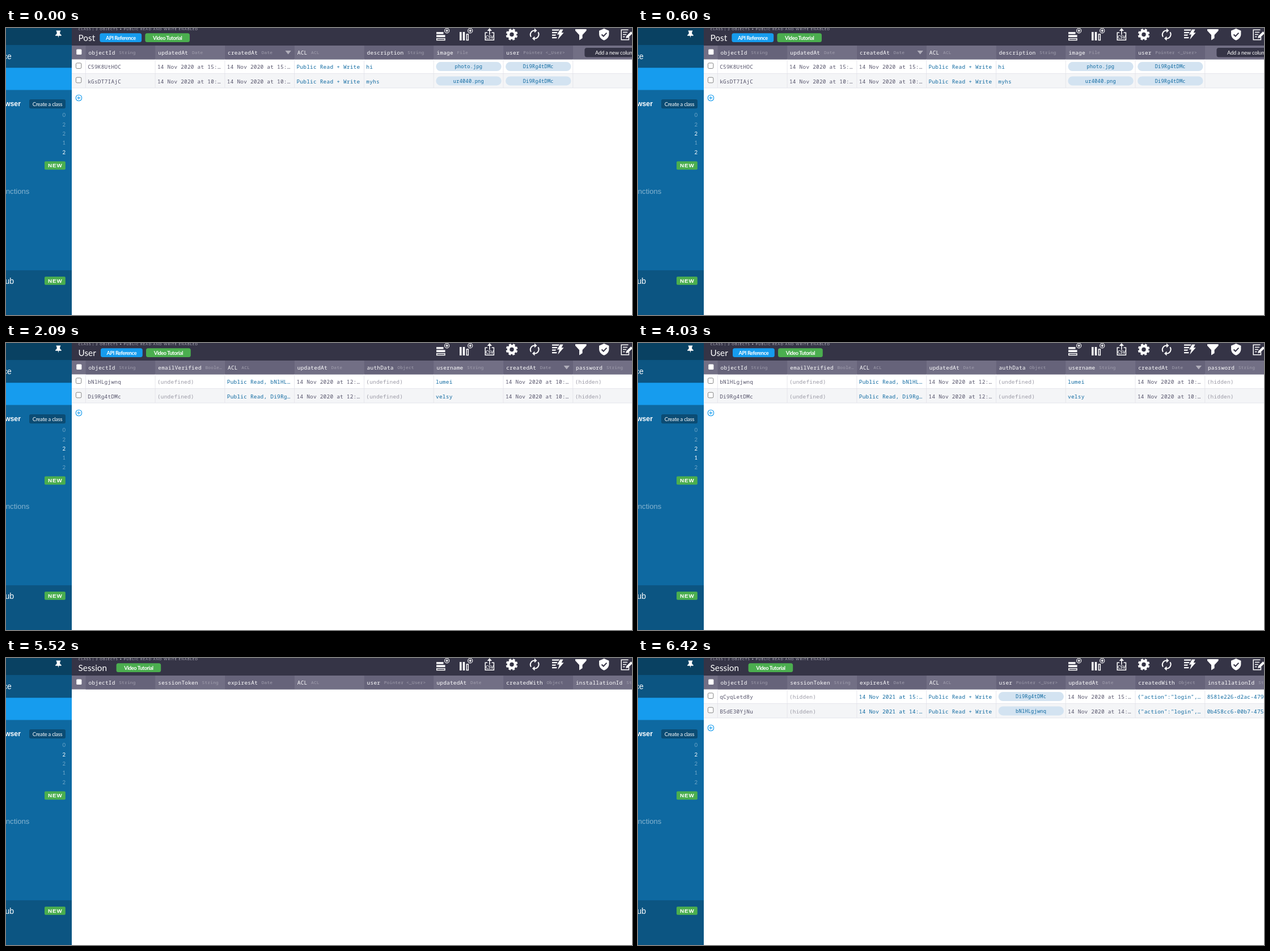
An HTML page that plays this animation: 1104x507 px, repeating every 8000 ms.

```html
<!DOCTYPE html>
<html lang="en">
<head>
<meta charset="utf-8">
<title>Data browser</title>
<style>
html, body { margin: 0; width: 100%; height: 100%; overflow: hidden; background: #fff; }
svg { display: block; width: 100%; height: 100%; }
text { white-space: pre; }
.mono { font: 9.4px "Noto Sans Mono", "DejaVu Sans Mono", monospace; letter-spacing: .26px; }
.type { font-size: 7.9px; letter-spacing: .17px; fill: #a19fae; }
.pill { font-size: 8.6px; letter-spacing: .25px; }
.ui { font-family: Lato, "Open Sans", sans-serif; }
.side { font-family: "Liberation Sans", Arial, sans-serif; fill: #fff; }
.btn { font-size: 9.2px; font-weight: 700; letter-spacing: -.42px; fill: #fff; }
.new { font-size: 9.8px; font-weight: 700; letter-spacing: .9px; }
.line { fill: none; stroke: #fff; stroke-width: 1.5; }
.count { font-size: 9.6px; fill: #6ea5c7; }

.scene, .count { animation: 8s step-end infinite; }
.postHead { animation-name: post; }
.postRows { animation-name: post; }
.userHead { animation-name: userHead; }
.userRows { animation-name: userRows; }
.sessionHead { animation-name: sessionHead; }
.sessionRows { animation-name: sessionRows; }
@keyframes post { 0% { visibility: visible } 20.5%, 100% { visibility: hidden } }
@keyframes userHead { 0% { visibility: hidden } 20.5% { visibility: visible } 69%, 100% { visibility: hidden } }
@keyframes userRows { 0% { visibility: hidden } 26.125% { visibility: visible } 69%, 100% { visibility: hidden } }
@keyframes sessionHead { 0% { visibility: hidden } 69%, 100% { visibility: visible } }
@keyframes sessionRows { 0% { visibility: hidden } 80.25%, 100% { visibility: visible } }

.sessionCount { animation-name: sessionCount; }
.userCount { animation-name: userCount; }
.oneCount { animation-name: oneCount; }
.postCount { animation-name: postCount; }
@keyframes sessionCount { 0% { fill: #6ea5c7 } 63.5%, 100% { fill: #fff } }
@keyframes userCount { 0% { fill: #6ea5c7 } 7.5% { fill: #fff } 69%, 100% { fill: #6ea5c7 } }
@keyframes oneCount { 0% { fill: #6ea5c7 } 50.375% { fill: #fff } 63.5%, 100% { fill: #6ea5c7 } }
@keyframes postCount { 0% { fill: #fff } 20.5%, 100% { fill: #6ea5c7 } }
</style>
</head>
<body>
<svg id="stage" viewBox="0 0 1104 507" preserveAspectRatio="none"></svg>
<script>
const LEFT = 140.6, COL = 122.78, CHAR = 5.9;
const INK = '#55536a', LINK = '#0e69a1', MUTED = '#9a99a5', BLUE = '#169cee', GREEN = '#4bae4f';
const colX = i => LEFT + i * COL;
const esc = s => s.replace(/&/g, '&amp;').replace(/</g, '&lt;');
const rect = (x, y, w, h, fill, r = 0, more = '') =>
  `<rect x="${x}" y="${y}" width="${w}" height="${h}" fill="${fill}" rx="${r}" ${more}/>`;
const text = (x, y, s, cls, more = '') => `<text x="${x}" y="${y}" class="${cls}" ${more}>${esc(s)}</text>`;
const mid = 'text-anchor="middle"', end = 'text-anchor="end"';
const path = (d, cls = '') => `<path d="${d}" ${cls ? `class="${cls}"` : 'fill="#fff"'}/>`;
const button = (x, w, fill, label) => rect(x, 9.3, w, 15.8, fill, 3.5) + text(x + w / 2, 20.9, label, 'ui btn', mid);

function sidebar() {
  const badge = y => rect(68, y, 36.8, 14.6, GREEN, 2) + text(74, y + 10.8, 'NEW', 'side new');
  const counts = [['0', ''], ['2', 'sessionCount'], ['2', 'userCount'], ['1', 'oneCount'], ['2', 'postCount']];
  return rect(0, 0, 116, 507, '#0e69a1') + rect(0, 0, 116, 30.5, '#094162') +
    rect(0, 30.5, 116, 40, '#0c5582') + rect(0, 70.3, 116, 39.2, BLUE) + rect(0, 428, 116, 79, '#0c5582') +
    path('M88.6 4.5h7.6v1.4l-1 .8v3.6l2.5 2.1v1.3h-4.6l-.7 3.8-.7-3.8h-4.6v-1.3l2.5-2.1V6.7l-1-.8z') +
    text(9.8, 55, 'ce', 'side', end + ' font-size="14"') +
    text(26, 138.3, 'wser', 'side', end + ' font-size="12.3" font-weight="700"') +
    text(41.3, 293, 'nctions', 'side', end + ' font-size="13.1" style="fill:#86b4d0"') +
    text(14, 451.5, 'ub', 'side', end + ' font-size="14"') +
    rect(41, 126, 64, 16.2, '#0b4c74', 3) +
    text(73, 137.5, 'Create a class', 'ui', mid + ' font-size="9.4" letter-spacing="-.25" fill="#fff"') +
    counts.map(([n, cls], i) => text(105, 157.2 + i * 16.35, n, 'ui count ' + cls, end)).join('') +
    badge(235.6) + badge(439.2);
}

function icons() {
  const plus = x => `<circle cx="${x}" cy="4.8" r="4.1" class="line" stroke-width="1" style="stroke-width:1.1"/>` +
    path(`M${x - 2.2} 4.8h4.4M${x} 2.6v4.4`, 'line');
  const addRow = rect(759, 7.2, 12.5, 3.4, '#fff') + rect(759, 12.4, 15.5, 3.6, '#fff') +
    path('M759.7 18.4h14.2v3h-14.2z', 'line') + plus(777.6);
  const addCol = rect(800, 7, 3.5, 15, '#fff') + rect(805.7, 7, 3.5, 15, '#fff') +
    path('M812.3 11v10.4h3V11z', 'line') + plus(818.7);
  const csv = path('M849 8.2h-3.8v13.1h15.2V8.2h-3.8M852.8 12V3', 'line') +
    path('M852.8 .2l4.2 4.8h-8.4z') +
    text(852.9, 19.4, 'CSV', 'ui', mid + ' font-size="7.3" font-weight="700" fill="#fff"');
  const gear = '<g fill="none" stroke="#fff" transform="rotate(11 892 11.5)"><circle cx="892" cy="11.5" r="6" stroke-width="4.6"/>' +
    '<circle cx="892" cy="11.5" r="8.8" stroke-width="3.2" stroke-dasharray="3.8 3.11"/></g>';
  const sync = '<g fill="none" stroke="#fff" stroke-width="2"><path d="M926 15.6A7.2 7.2 0 0 1 932.5 4.5"/><path d="M938.4 7.4A7.2 7.2 0 0 1 931.9 18.5"/></g>' +
    path('M932 .6l4.4 3.9-4.4 3.9zM932.4 14.6l-4.4 3.9 4.4 3.9z');
  const bolt = path('M963 2.5h13l-1.5 2.2H963zM963 7.1h9.8l-1.4 2.2H963zM963 11.6h7l-.8 2.2H963zM963 16.1h8.5l-.4 2.2H963z') +
    path('M977.3 2.5h5.3l-3 5.7h4l-10.3 12 2.6-8.6h-4z');
  const funnel = path('M1004 2h19.6v2.7l-7 7.6V18l-5.6 3.5v-9.2l-7-7.6z');
  const shield = path('M1054.7 1l8.7 3.7v6.1c0 5-3.5 9.4-8.7 10.9-5.2-1.5-8.7-5.9-8.7-10.9V4.7z') +
    '<path d="M1050.5 11.4l3.2 3.2 5.6-6" fill="none" stroke="#353446" stroke-width="2.1"/>';
  const edit = path('M1097.5 3.2h-12.3v17.6h13.2v-5M1088 7.6h8M1088 11.6h6M1088 15.6h3.5', 'line') +
    path('M1102.2 6.2l3 3-8.2 8-3.8.9.9-3.8z');
  return addRow + addCol + csv + gear + sync + bolt + funnel + shield + edit;
}

// One header cell per "name type" pair, alternating shades.
function head(title, buttons, cols, sorted) {
  let out = text(127.6, 23.4, title, 'ui', 'font-size="15.3" fill="#fff"') + buttons;
  cols.forEach(([name, type], i) => {
    const x = colX(i);
    out += rect(x, 31, COL, 24.4, i % 2 ? '#726f85' : '#66637a') +
      text(x + 4.9, 46.5, name, 'mono', 'fill="#fff"') +
      text(x + 11.4 + name.length * CHAR, 46.2, type, 'mono type');
    if (i === sorted) out += `<path d="M${x + 106.3} 40h10.4l-5.2 6.6z" fill="#b0aeba"/>`;
  });
  return out;
}

const cell = {
  ink: (x, y, s) => text(x + 3.6, y, s, 'mono', `fill="${INK}"`),
  link: (x, y, s) => text(x + 3.6, y, s, 'mono', `fill="${LINK}"`),
  muted: (x, y, s) => text(x + 3.6, y, s, 'mono', `fill="${MUTED}"`),
  pill: (x, y, s) => rect(x + 3.8, y - 12.3, 115.4, 16, '#d3e3f1', 8) +
    text(x + COL / 2, y - 1, s, 'mono pill', `${mid} fill="${LINK}"`)
};

function rows(kinds, data) {
  let out = rect(116, 80.8, 988, 25.2, '#f4f5f7') + rect(116, 80, 988, .9, '#e3e3ea') + rect(116, 105.5, 988, .9, '#e3e3ea');
  for (let i = 0; i <= kinds.length && i < 8; i++) out += rect(colX(i) - .7, 55.4, .85, 50.6, '#e3e3ea');
  data.forEach((row, r) => {
    const y = 72.4 + r * 25.3;
    out += rect(123.4, y - 10.5, 9.4, 9.6, '#fff', 2, 'stroke="#767676" stroke-width=".9"');
    row.forEach((s, i) => out += cell[kinds[i]](colX(i), y, s));
  });
  return out + `<g fill="none" stroke="${BLUE}" stroke-width="1.1"><circle cx="128.4" cy="123.5" r="5.3"/><path d="M125.3 123.5h6.2M128.4 120.4v6.2"/></g>`;
}

const scene = (cls, body) => `<g class="scene ${cls}">${body}</g>`;
const day = (year, hour) => `14 Nov ${year} at ${hour}:…`;
const open = 'Public Read + Write';

const post = head('Post', button(165.4, 73.8, BLUE, 'API Reference') + button(245.4, 78.6, GREEN, 'Video Tutorial'),
  [['objectId', 'String'], ['updatedAt', 'Date'], ['createdAt', 'Date'], ['ACL', 'ACL'],
   ['description', 'String'], ['image', 'File'], ['user', 'Pointer <_User>']], 2) +
  rect(colX(7), 31, COL, 24.4, '#726f85') + rect(1020.4, 35, 100, 16.4, '#353446', 4) +
  text(1039, 46.5, 'Add a new column', 'ui', 'font-size="9.2" letter-spacing="-.1" fill="#fff"');
const postRows = rows(['ink', 'ink', 'ink', 'link', 'link', 'pill', 'pill'], [
  ['C59K8UtHOC', day(2020, 15), day(2020, 15), open, 'hi', 'photo.jpg', 'Di9Rg4tDMc'],
  ['kGsDT7IAjC', day(2020, 10), day(2020, 10), open, 'myhs', 'ur4040.png', 'Di9Rg4tDMc']]);

const user = head('User', button(167, 73.8, BLUE, 'API Reference') + button(247, 78.8, GREEN, 'Video Tutorial'),
  [['objectId', 'String'], ['emailVerified', 'Boole…'], ['ACL', 'ACL'], ['updatedAt', 'Date'],
   ['authData', 'Object'], ['username', 'String'], ['createdAt', 'Date'], ['password', 'String']], 6);
const userRows = rows(['ink', 'muted', 'link', 'ink', 'muted', 'link', 'ink', 'muted'], [
  ['bNlHLgjwnq', '(undefined)', 'Public Read, bNlHL…', day(2020, 12), '(undefined)', 'lumei', day(2020, 10), '(hidden)'],
  ['Di9Rg4tDMc', '(undefined)', 'Public Read, Di9Rg…', day(2020, 12), '(undefined)', 'velsy', day(2020, 10), '(hidden)']]);

const session = head('Session', button(194.6, 78.6, GREEN, 'Video Tutorial'),
  [['objectId', 'String'], ['sessionToken', 'String'], ['expiresAt', 'Date'], ['ACL', 'ACL'],
   ['user', 'Pointer <_User>'], ['updatedAt', 'Date'], ['createdWith', 'Object'], ['installationId', 'String']]);
const sessionRows = rows(['ink', 'muted', 'link', 'link', 'pill', 'ink', 'link', 'link'], [
  ['qCyqLetd8y', '(hidden)', day(2021, 15), open, 'Di9Rg4tDMc', day(2020, 15), '{"action":"login",…', '8581e226-d2ac-479'],
  ['B5dE30YjNu', '(hidden)', day(2021, 14), open, 'bNlHLgjwnq', day(2020, 14), '{"action":"login",…', '0b458cc6-00b7-475']]);

document.getElementById('stage').innerHTML =
  rect(0, 0, 1104, 507, '#fff') + rect(116, 0, 988, 31, '#353446') + rect(116, 31, 988, 24.4, '#726f85') +
  text(127.6, 4.3, 'CLASS | 2 OBJECTS • PUBLIC READ AND WRITE ENABLED', 'ui', 'font-size="6" letter-spacing="1.04" fill="#b3b1bd"') +
  icons() + scene('postHead', post) + scene('postRows', postRows) +
  scene('userHead', user) + scene('userRows', userRows) +
  scene('sessionHead', session) + scene('sessionRows', sessionRows) +
  rect(124.2, 37.6, 9.2, 9.4, '#fff', 1.5) + sidebar();
</script>
</body>
</html>
```
